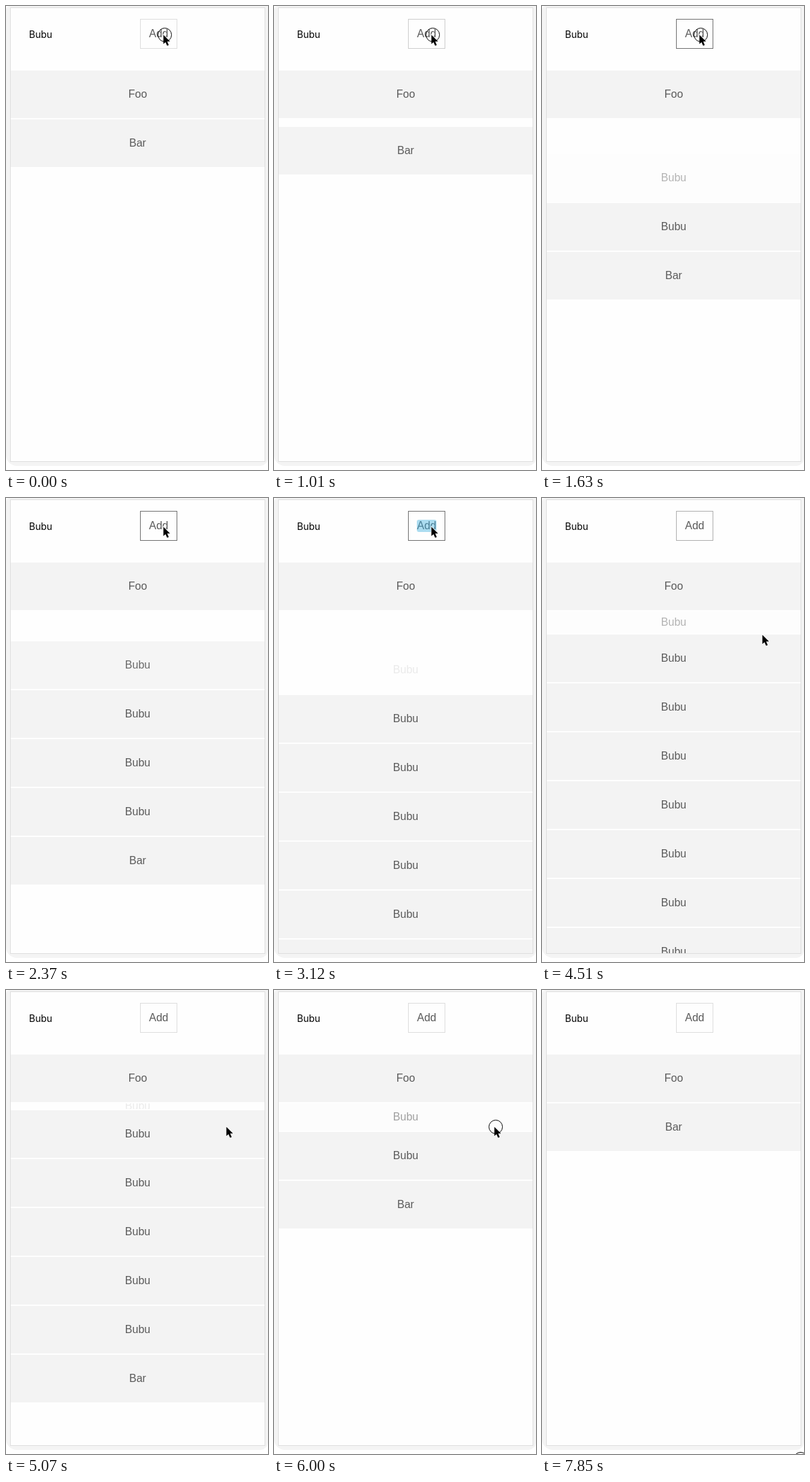
Recreate the animation shown at these times as an HTML page. Size 387 by 683 pixels, loop 7950 ms.

```html
<!DOCTYPE html>
<html lang="en">
<head>
<meta charset="utf-8">
<title>List transition</title>
<style>
  html, body { margin: 0; width: 100%; height: 100%; overflow: hidden; background: #fff; }
  #stage {
    position: absolute; left: 0; top: 0; width: 387px; height: 683px; overflow: hidden;
    font: 16px/20px "Liberation Sans", Arial, sans-serif; color: #5a5a5a; cursor: default;
  }
  #stage * { box-sizing: border-box; }
  .shade {
    position: absolute; left: 0; top: 0; width: 387px; height: 677px;
    background: #f4f4f4; border-radius: 6px 0 12px 16px;
  }
  .panel {
    position: absolute; left: 6px; top: 2px; width: 377px; height: 669px;
    background: #fefefe; border: 1px solid #dedede; overflow: hidden;
  }
  .field {
    position: absolute; left: 27px; top: 29px;
    font: 14px/20px Inter, "Open Sans", sans-serif; color: #000;
  }
  #add {
    position: absolute; left: 191px; top: 16px; width: 55px; height: 44px;
    border: 1px solid #ddd; text-align: center; line-height: 18px; padding-top: 12px;
  }
  #add span { display: inline-block; border-radius: 3px; }
  #add.picked span { background: #abdcf0; color: #4a7f96; }
  #list { position: absolute; left: 0; top: 92px; width: 375px; }
  .item {
    position: relative; height: 70px; margin-bottom: 2px; overflow: hidden;
    background: #f3f3f3; text-align: center;
  }
  .item span { position: absolute; left: 0; width: 100%; top: 50%; margin-top: -10px; }
  #over { position: absolute; left: 0; top: 0; }
</style>
</head>
<body>
<div id="stage">
  <div class="shade"></div>
  <div class="panel">
    <div class="field">Bubu</div>
    <div id="add"><span>Add</span></div>
    <div id="list"></div>
  </div>
  <svg id="over" width="387" height="683">
    <path id="arrow" d="M0 0V13.6L3.1 10.7L5.5 16L7.9 15L5.6 9.8H9.8Z"
          fill="#000" stroke="#fff" stroke-width="1.4" paint-order="stroke"/>
    <circle id="ring" r="10" fill="none" stroke="#000"/>
  </svg>
</div>
<script>
  const LOOP = 7950, STEP = 300, FULL = 70;
  const added = [970, 1195, 1420, 1800, 2190, 2785, 2910, 3400];
  const removed = [6140, 5871, 5630, 5390, 5140, 4804, 4576, 4347];

  // Pointer button held down, [from, to]
  const holds = [
    [0, 60], [590, 770], [950, 1020], [1130, 1230], [1350, 1450], [1600, 1800],
    [2080, 2200], [2700, 2790], [2860, 2930], [3330, 3430], [5990, 6140],
    ...removed.slice(1).map(t => [t - 62, t])
  ];
  // Pointer tip: time, x, y
  const track = [
    [0, 232.5, 42.5], [3440, 232.5, 42.5], [3600, 300, 22], [3850, 377, 80],
    [4200, 325.5, 201.5], [6660, 325.5, 201.5]
  ];

  const $ = id => document.getElementById(id);
  const clamp = v => Math.max(0, Math.min(1, v));
  const mix = (a, b, k) => a + (b - a) * k;
  const within = (t, [from, to]) => t >= from && t < to;

  function addItem(text) {
    const el = document.createElement('div');
    const label = document.createElement('span');
    el.className = 'item';
    label.textContent = text;
    el.append(label);
    $('list').append(el);
    return el;
  }

  addItem('Foo');
  const rows = added.map((_, i) => i).reverse().map(i => ({
    el: addItem('Bubu'), from: added[i], to: removed[i]
  }));
  addItem('Bar');

  // Entering: grow, then fade in. Leaving: shrink and fade together.
  function drawRow({ el, from, to }, t) {
    const live = within(t, [from, to + STEP]);
    el.style.display = live ? '' : 'none';
    if (!live) return;
    const left = 1 - clamp((t - to) / STEP);
    const size = Math.min(clamp((t - from) / STEP), left);
    const alpha = Math.min(clamp((t - from) / STEP - 1), left);
    el.style.height = Math.round(FULL * size) + 'px';
    el.style.background = `rgba(243,243,243,${alpha ** 3})`;
    el.firstChild.style.opacity = alpha;
  }

  function tipAt(t) {
    if (t >= 6660) return [354, 218];
    const i = track.findIndex(p => p[0] > t);
    const [t0, x0, y0] = track[i - 1], [t1, x1, y1] = track[i];
    const k = (t - t0) / (t1 - t0);
    return [mix(x0, x1, k), mix(y0, y1, k)];
  }

  function drawPointer(t) {
    const [x, y] = tipAt(t);
    const last = t >= 7850;
    $('arrow').setAttribute('transform', `translate(${x} ${y})`);
    $('arrow').style.display = t < 6720 ? '' : 'none';
    $('ring').setAttribute('cx', last ? 382 : x + 2);
    $('ring').setAttribute('cy', last ? 690.5 : y);
    $('ring').style.display = last || holds.some(h => within(t, h)) ? '' : 'none';
  }

  function drawButton(t) {
    const focus = clamp((t - 950) / 400) - clamp((t - 4280) / 400);
    const c = Math.round(mix(221, 112, focus));
    $('add').style.borderColor = `rgb(${c},${c},${c})`;
    $('add').className = within(t, [2870, 3360]) ? 'picked' : '';
  }

  let start;
  function frame(now) {
    start ??= now;
    const t = Math.max(0, now - start) % LOOP;
    rows.forEach(row => drawRow(row, t));
    drawButton(t);
    drawPointer(t);
    requestAnimationFrame(frame);
  }
  requestAnimationFrame(frame);
</script>
</body>
</html>
```
